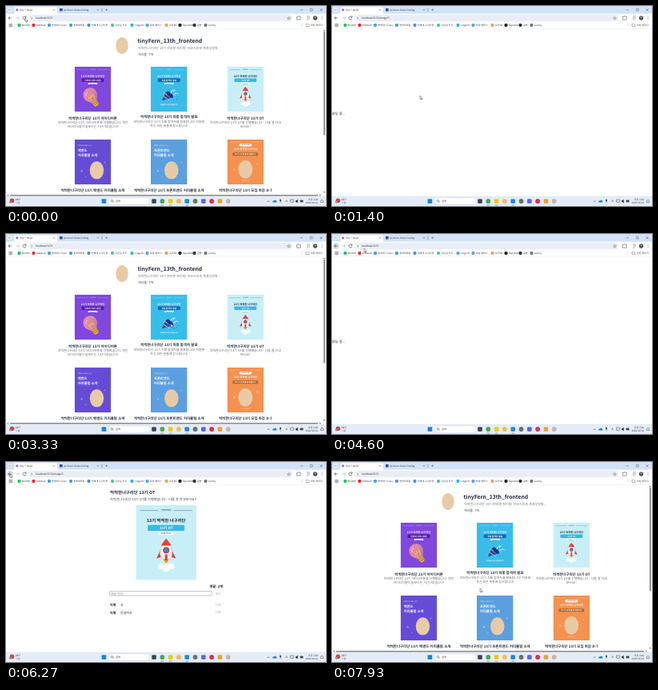
Write an HTML page that moves like this. It is 400 by 250 pixels and loops after 8000 ms.

```html
<!DOCTYPE html>
<html lang="ko">
<head>
<meta charset="utf-8">
<title>Vite + React</title>
<style>
  html, body { margin: 0; width: 100%; height: 100%; overflow: hidden; background: #fff; }
  svg#stage { display: block; width: 100vw; height: 100vh; }
  text {
    font-family: "Noto Sans CJK KR", "Noto Sans CJK", "Noto Sans", sans-serif;
    text-rendering: geometricPrecision;
    white-space: pre;
  }
  .list, .load, .first, .second, .third, .home, .visit1, .visit2, .visit3, .hover {
    animation: 8s step-end infinite;
  }
  .list { animation-name: list; }
  .load { animation-name: load; }
  .first { animation-name: first; }
  .second { animation-name: second; }
  .third { animation-name: third; }
  .home { animation-name: home; }
  .visit1 { animation-name: visit1; }
  .visit2 { animation-name: visit2; }
  .visit3 { animation-name: visit3; }
  .hover { animation-name: hover; }
  .cursor { animation: cursor 8s ease-in-out infinite; }

  @keyframes list {
    0%, 36.9%, 60%, 91.25% { opacity: 1; }
    15.6%, 42.9%, 68.75% { opacity: 0; }
    100% { opacity: 1; }
  }
  @keyframes load {
    0%, 18.1%, 36.9%, 45.6%, 60%, 71.25%, 91.25%, 100% { opacity: 0; }
    15.6%, 34.4%, 42.9%, 56.25%, 68.75%, 88.1% { opacity: 1; }
  }
  @keyframes first { 0%, 34.4%, 100% { opacity: 0; } 18.1% { opacity: 1; } }
  @keyframes second { 0%, 56.25%, 100% { opacity: 0; } 45.6% { opacity: 1; } }
  @keyframes third { 0%, 88.1%, 100% { opacity: 0; } 71.25% { opacity: 1; } }
  @keyframes home {
    0%, 34.4%, 56.25%, 88.1%, 100% { opacity: 1; }
    15.6%, 42.9%, 68.75% { opacity: 0; }
  }
  @keyframes visit1 { 0%, 34.4%, 100% { opacity: 0; } 15.6% { opacity: 1; } }
  @keyframes visit2 { 0%, 56.25%, 100% { opacity: 0; } 42.9% { opacity: 1; } }
  @keyframes visit3 { 0%, 88.1%, 100% { opacity: 0; } 68.75% { opacity: 1; } }
  @keyframes hover {
    0%, 34.8%, 58.5%, 89%, 100% { opacity: 0; }
    32.8%, 54.2%, 76.5% { opacity: 1; }
  }
  @keyframes cursor {
    0% { transform: translate(24px, 15px); }
    7.5% { transform: translate(54px, 23px); }
    14%, 26% { transform: translate(110px, 112px); }
    33%, 35% { transform: translate(5px, 15px); }
    41.5%, 47% { transform: translate(206px, 112px); }
    54.5%, 56.5% { transform: translate(5px, 15px); }
    57.5% { transform: translate(40px, 18px); }
    67.5%, 71% { transform: translate(295px, 112px); }
    77%, 89% { transform: translate(5px, 15px); }
    97%, 100% { transform: translate(185px, 158px); }
  }
</style>
</head>
<body>
<svg id="stage" viewBox="0 0 400 250" preserveAspectRatio="none"></svg>
<script>
const CLUB = '씩씩한너구리단';
const INK = '#202a3c';

const rect = (x, y, w, h, fill, r = 0, extra = '') =>
  `<rect x="${x}" y="${y}" width="${w}" height="${h}" rx="${r}" fill="${fill}" ${extra}/>`;
const dot = (x, y, r, fill, extra = '') =>
  `<circle cx="${x}" cy="${y}" r="${r}" fill="${fill}" ${extra}/>`;
const path = (d, fill, stroke = 'none', width = .6) =>
  `<path d="${d}" fill="${fill}" stroke="${stroke}" stroke-width="${width}"/>`;
// y is the vertical middle of the line
const label = (x, y, size, str, { fill = '#333', bold = 400, anchor = 'start', cls = '' } = {}) =>
  `<text class="${cls}" x="${x}" y="${y + size * .36}" font-size="${size}" font-weight="${bold}" fill="${fill}" text-anchor="${anchor}">${str}</text>`;
const centered = (x, y, size, str, fill, bold = 400) =>
  label(x, y, size, str, { fill, bold, anchor: 'middle' });
const group = (cls, body) => `<g class="${cls}">${body}</g>`;
const mascot = (x, y, rx = 7.8, ry = 10.6) =>
  `<ellipse cx="${x}" cy="${y}" rx="${rx}" ry="${ry}" fill="#e8cba6"/>`;

// Posters, drawn on a 46 x 57 sheet
function eventPoster(bg, ink, pill, title, art) {
  return rect(0, 0, 46, 57, bg)
    + path('M3 4H17M29 4H43', 'none', ink, .2) + centered(23, 4, 1.6, '인하대학교', ink)
    + centered(23, 11.8, 3.25, '13기 씩씩한 너구리단', ink, 800)
    + rect(9, 15, 28, 4.5, pill, .8)
    + centered(23, 17.2, 2.7, title, '#fff', 600)
    + rect(17, 20.6, 12, 2, '#fff', 1)
    + centered(23, 21.6, 1.4, '2025.03.21', '#444', 600)
    + art;
}
function coursePoster(bg, title, mascotX) {
  const white = { fill: '#fff', bold: 800 };
  return rect(0, 0, 46, 57, bg)
    + label(4, 8, 2, '씩씩한너구리단 13기', { fill: '#fff' })
    + label(4, 14, 4.3, title, white)
    + label(4, 19.8, 4.3, '커리큘럼 소개', white)
    + dot(9, 40, 1.2, '#ffffff55') + dot(38, 29, .9, '#ffffff55') + dot(14, 47, .8, '#ffffff55')
    + mascot(mascotX, 39, 8.8, 11.2);
}

const bulb = `<g transform="translate(20.5 37) rotate(-32) scale(.9)">
  ${path('M-4 7L-3.6 15Q0 18 3.6 15L4 7Z', '#e6b32c')}
  ${path('M-4 11H4M-3.6 13.6H3.6', 'none', '#8a5a20', .7)}
  <path d="M-5 9Q-5 7-7.5 5A10 10 0 1 1 7.5 5Q5 7 5 9Z" fill="url(#glass)"/>
  ${path('M-2 8L-4 0L-1 2L0 -1L1 2L4 0L2 8', 'none', '#f5c13c', 1)}
  ${path('M-6 -3Q-5 -7 -1 -7.5', 'none', '#f9c6dc', 1)}</g>`;

const confettiColors = ['#ffd84a', '#f05a7e', '#ffffff', '#3450c8'];
const confetti = Array.from({ length: 14 }, (_, i) => {
  const angle = i * 2.4, reach = 5 + (i * 5) % 8;
  return rect((25 + reach * Math.cos(angle)).toFixed(1), (35 + reach * .65 * Math.sin(angle)).toFixed(1),
    1.1, .9, confettiColors[i % 4], .2);
}).join('');
const popper = confetti
  + path('M14 43L19 32Q26 32 28 39Z', '#2846b4')
  + path('M16.5 38L21 41M18 34L25 39', 'none', '#ffd84a', 1)
  + `<ellipse cx="24" cy="35.5" rx="5.2" ry="2.4" transform="rotate(42 24 35.5)" fill="#16328c"/>`
  + path('M25 34Q27 28 31 30M28 36Q32 32 35 35', 'none', '#fff', .8)
  + centered(23, 48.5, 2, '함께하게 되어 반갑습니다!', '#fff', 700);

const rocket = dot(19, 46.5, 2.2, '#f7fdff') + dot(23, 47.5, 3.2, '#f7fdff') + dot(27, 46.5, 2.4, '#f7fdff')
  + path('M20.5 40Q23 48 25.5 40Z', '#f79a2e')
  + path('M18.8 34L15.6 40.5L19.8 39.3ZM27.2 34L30.4 40.5L26.2 39.3Z', '#df4038')
  + path('M23 25.5Q30 33 26.5 41H19.5Q16 33 23 25.5Z', '#f1eef0', '#b8c4cc', .4)
  + path('M23 25.5Q25.8 28.5 26.8 30.8H19.2Q20.2 28.5 23 25.5Z', '#e2443c')
  + dot(23, 34.3, 2, '#2f8fd0', 'stroke="#b8402f" stroke-width=".8"')
  + path('M22.1 37.5H23.9V42H22.1Z', '#df4038');

const recruit = rect(0, 0, 46, 57, '#f5924f')
  + path('M3 3.5H17M29 3.5H43', 'none', '#fff', .2)
  + rect(15, 5.6, 16, 3.2, '#fff', 1.6)
  + centered(23, 7.2, 1.8, '너구리단 모집', '#a04a18', 600)
  + centered(23, 12.6, 3.25, '13기 씩씩한 너구리단', '#fff', 800)
  + rect(7, 16.8, 32, 4, '#ad6a34', .6)
  + centered(23, 18.8, 2.5, '아기 너구리를 모집합니다', '#fff', 600)
  + mascot(23, 38, 9, 11.5)
  + dot(9, 38, 1.2, '#ffffff55') + dot(38, 31, 1, '#ffffff55')
  + centered(23, 52.5, 1.8, '모집 마감 D-7', '#fff');

const posters = [
  eventPoster('#8048df', '#fff', '#5717a8', '인하대 아이디어톤', bulb),
  eventPoster('#38bdeb', '#fff', '#1765b8', '최종 합격자 발표', popper),
  eventPoster('#c8eff8', '#142030', '#36b9e2', '13기 OT', rocket),
  coursePoster('#654cd6', '백엔드', 28),
  coursePoster('#5b9fe0', '프론트엔드', 26),
  recruit,
];
const poster = (i, x, y, w, h) => `<use href="#poster${i}" x="${x}" y="${y}" width="${w}" height="${h}"/>`;

const defs = `<defs>
  <linearGradient id="glass" x1="0" y1="0" x2="1" y2="1">
    <stop offset="0" stop-color="#e786b8"/><stop offset=".55" stop-color="#d98c98"/><stop offset="1" stop-color="#b065c0"/>
  </linearGradient>
  ${posters.map((p, i) => `<symbol id="poster${i}" viewBox="0 0 46 57" preserveAspectRatio="none">${p}</symbol>`).join('')}
</defs>`;

// Browser frame
function bookmark([x, color, name]) {
  return rect(x - 2, 22, 4, 4, color, 1.4) + label(x + 3.5, 24, 3, name);
}
const bookmarks = [
  [16.5, '#16c75c', 'MOORI'], [34.5, '#ef2b2b', 'VidNook'], [54, '#4aa0d8', '인하대 I-Class'],
  [81, '#4aa0d8', '인하대포털'], [103.5, '#4b90d8', '인하대 수강신청'], [133, '#4cc9a0', '다온길 지도'],
  [157.5, '#36b5ee', 'Lingomi'], [176.5, '#58a4e8', '토담 캠퍼스'], [200.5, '#e5a25f', 'OZTAE'],
  [217.5, '#222', 'RepoNet'], [235.5, '#333', '글방'], [249.5, '#777', 'Lumiq'],
];
const url = (suffix, cls) => label(37, 15, 3.15, 'localhost:5173' + suffix, { fill: '#222', cls });

const chrome = rect(0, 0, 400, 10, '#d2e2f8')
  + rect(0, 9.6, 400, 18.6, '#fff')
  + dot(4.5, 4.6, 2.6, '#e6effc') + path('M3.5 4.2L4.5 5.2L5.5 4.2', 'none', '#333', .5)
  + path('M9 10Q10.5 10 10.5 8V3.5Q10.5 1.5 12.5 1.5H62Q64 1.5 64 3.5V8Q64 10 65.5 10Z', '#fff')
  + dot(13.8, 4.8, 1.6, '#9a62ee') + label(17, 4.8, 3, 'Vite + React')
  + path('M59 3.7L61 5.7M61 3.7L59 5.7', 'none', '#444', .4)
  + rect(67, 3, 3.6, 3.6, '#2d4f98', .5) + label(72.5, 4.8, 3, 'picloom clone Coding')
  + path('M114 3.7L116 5.7M116 3.7L114 5.7M120 2.5V7M125.6 3.2V6.4M124 4.8H127.2', 'none', '#444', .4)
  + path('M368 4.8H371M392.5 3.3L395.5 6.3M395.5 3.3L392.5 6.3', 'none', '#333', .45)
  + rect(380.3, 3.3, 2.8, 2.8, 'none', .3, 'stroke="#333" stroke-width=".4"')
  + group('hover', dot(5, 15, 4, '#d8dce2'))
  + path('M7 15H3M4.8 13.2L3 15L4.8 16.8', 'none', '#333')
  + path('M12.5 15H16.5M14.7 13.2L16.5 15L14.7 16.8', 'none', '#aaa')
  + path('M24.8 14A2 2 0 1 0 25 15.6M25 12.6V14.3H23.4', 'none', '#333')
  + rect(28, 10.8, 330, 8.4, '#e9eef6', 4.2)
  + dot(32.2, 15, 2.8, '#fff') + path('M30.8 14.1H33.6M30.8 16H33.6', 'none', '#444', .5)
  + url('', 'home') + url('/image/7', 'visit1') + url('/image/6', 'visit2') + url('/image/5', 'visit3')
  + path('M353.5 13.2L354.1 14.5L355.5 14.6L354.4 15.6L354.7 17L353.5 16.2L352.3 17L352.6 15.6L351.5 14.6L352.9 14.5Z', 'none', '#555', .4)
  + path('M363.5 13.5H365A1 1 0 0 1 367 13.5H368.2V17.2H363.5Z', 'none', '#444', .5)
  + path('M376 13H380M376 15H380M376 17H378.5', 'none', '#555', .5)
  + dot(386.5, 15, 2.7, '#4b5260') + dot(386.5, 14.2, 1, '#b5a598')
  + dot(395, 13.3, .45, '#333') + dot(395, 15, .45, '#333') + dot(395, 16.7, .45, '#333')
  + path('M4 22.3H7.5V25.8H4ZM5.75 22.3V25.8M4 24H7.5', 'none', '#555', .5)
  + path('M11 22V26', 'none', '#bbb', .3)
  + bookmarks.map(bookmark).join('')
  + path('M370 22V26', 'none', '#bbb', .3) + path('M375 22.5H377L377.5 23H379V25.7H375Z', 'none', '#555', .4)
  + label(381, 24, 3, '모든 북마크')
  + path('M0 28.2H400', 'none', '#dfe3e8', .4);

// Post list
const posts = [
  { x: 108.5, y: 75.7, titleY: 140, title: '13기 아이디어톤',
    desc: [`${CLUB} 13기 아이디어톤을 진행했습니다. 멋진`, '아이디어들이 돋보이는 시간이었습니다!'] },
  { x: 203.8, y: 75.7, titleY: 138.2, title: '13기 최종 합격자 발표',
    desc: [`${CLUB} 13기 최종 합격자를 발표합니다! 지원해`, '주신 모든 분들께 감사합니다!'] },
  { x: 299.3, y: 75.7, titleY: 140, title: '13기 OT',
    desc: [`${CLUB} 13기 OT를 진행했습니다~ 다들 잘 지내`, '보아요!!'] },
  { x: 108.5, y: 166.7, titleY: 230.8, title: '13기 백엔드 커리큘럼 소개', desc: [] },
  { x: 203.8, y: 166.7, titleY: 230.8, title: '13기 프론트엔드 커리큘럼 소개', desc: [] },
  { x: 299.3, y: 166.7, titleY: 230.8, title: '13기 모집 마감 D-7', desc: [] },
];
const card = (p, i) => poster(i, p.x - 22.8, p.y, 45.6, 56.4)
  + centered(p.x, p.titleY, 4.45, `${CLUB} ${p.title}`, INK, 700)
  + p.desc.map((line, n) => centered(p.x, p.titleY + 6 + n * 5.1, 3.85, line, '#666')).join('');

const list = mascot(145, 49.6)
  + label(164.5, 43.5, 6.8, 'tinyFern_13th_frontend', { fill: INK, bold: 700 })
  + label(165, 52.5, 4, `${CLUB} 13기 여러분 화이팅! 자유시리로 폭풍성장통..`, { fill: '#777' })
  + label(165, 60.3, 4, '게시물: 7개', { fill: '#444' })
  + posts.map(card).join('')
  + rect(395, 28.5, 5, 209.5, '#fafafa') + rect(0, 235, 395, 3, '#fafafa')
  + rect(397, 31.5, 1.7, 130, '#858585', .8) + rect(5, 236, 385, 1.5, '#858585', .7)
  + path('M396.6 31L397.8 29.4L399 31ZM396.6 232L397.8 233.8L399 232Z', '#777')
  + path('M3 235.4L1.4 236.7L3 238ZM392 235.4L393.6 236.7L392 238Z', '#777');

// Post detail
function detail(i, title, lines, comments) {
  const shift = (lines.length - 1) * 5.6;
  const muted = { fill: '#aaa' };
  return label(130, 38, 5.4, `${CLUB} ${title}`, { fill: INK, bold: 700 })
    + lines.map((line, n) => label(130, 47 + n * 5.7, 4.1, line, { fill: '#444' })).join('')
    + poster(i, 162.4, 54 + shift, 75.6, 93.6)
    + label(271, 155 + shift, 4.2, `댓글: ${comments.length}개`, { fill: '#111', bold: 700, anchor: 'end' })
    + rect(129.6, 161.6 + shift, 127.6, 5.4, '#fff', .6, 'stroke="#888" stroke-width=".5"')
    + label(131, 164.3 + shift, 3.8, '댓글 작성...', { fill: '#888' })
    + label(261.5, 164.3 + shift, 3.8, '게시', muted)
    + (comments.length ? '' : centered(200, 173.3 + shift, 4.1, '댓글이 없습니다.', '#444'))
    + comments.map((c, n) => {
      const y = 178.7 + n * 9.4 + shift;
      return label(130, y, 4, '익명', { fill: '#111', bold: 700 })
        + label(143, y, 4, c, { fill: '#222' }) + label(261.5, y, 3.8, '삭제', muted);
    }).join('');
}

const pages = group('list', list)
  + group('load', label(0, 134, 4.2, '로딩 중...', { fill: '#222' }))
  + group('first', detail(0, '13기 아이디어톤',
    [`${CLUB} 13기 아이디어톤을 진행했습니다. 멋진 아이디어들이 돋보이는 시`, '간이었습니다!'], []))
  + group('second', detail(1, '13기 최종 합격자 발표',
    [`${CLUB} 13기 최종 합격자를 발표합니다! 지원해주신 모든 분들께 감사합`, '니다!'], []))
  + group('third', detail(2, '13기 OT',
    [`${CLUB} 13기 OT를 진행했습니다~ 다들 잘 지내보아요!!`], ['굿', '안녕하슈']));

// Taskbar
const apps = ['#3c4450', '#4fa35c', '#f2c811', '#f0bd4a', '#2488d8', '#6a7078', '#5865e8', '#e8285c', '#f0a030', '#c9b3ad'];
const taskbar = rect(0, 238, 400, 12, '#e4edf7')
  + path('M0 238H400', 'none', '#cfd8e2', .4)
  + dot(7.5, 243.2, 2.8, '#d8433c') + dot(5.5, 245, 1.6, '#8796a8')
  + label(12, 242, 3, '88°F') + label(12, 246.4, 3, '구름', { fill: '#666' })
  + rect(119.6, 241.2, 5.6, 5.6, '#1685d8', .4)
  + rect(128, 240, 52, 8, '#fff', 4, 'stroke="#d3dce6" stroke-width=".4"')
  + dot(132.4, 243.6, 1.3, 'none', 'stroke="#333" stroke-width=".5"') + path('M133.4 244.6L134.5 245.8', 'none', '#333', .5)
  + label(137, 244, 3.3, '검색')
  + apps.map((color, i) => i % 2
      ? dot(185 + i * 10.3, 244, 2.9, color)
      : rect(182.2 + i * 10.3, 241.2, 5.6, 5.6, color, 1.3)).join('')
  + path('M193.5 249H197M203.8 249H207.3M224.5 249H228', 'none', '#5a86b4', .7)
  + path('M326.5 245L328 243.4L329.5 245', 'none', '#333', .5)
  + path('M333.4 245.5Q332.6 243.4 335 243.2Q337 241.4 338 243.8Q339.4 245.5 337.6 245.5Z', '#2784d8')
  + rect(342.2, 241.5, 1.6, 3, '#333', .8) + path('M343 244.5V246.4', 'none', '#333', .4)
  + centered(350.5, 244, 3.6, 'A', '#333')
  + rect(355.5, 242, 4.2, 3.2, 'none', .3, 'stroke="#333" stroke-width=".5"')
  + path('M362 243L363 243L364.7 241.6V246.4L363 245H362Z', '#333')
  + rect(367.5, 242.6, 4, 2.6, '#444', .5)
  + label(390, 242, 3, '오전 2:26', { anchor: 'end' }) + label(390, 246.4, 3, '2025-06-21', { anchor: 'end' })
  + path('M393 245.3Q393.7 242 395 242Q396.3 242 397 245.3Z', 'none', '#444', .5);

const cursor = group('cursor', path('M0 0V4.6L1.1 3.6L1.9 5.3L2.6 5L1.9 3.4H3.3Z', '#fff', '#222', .4));

document.getElementById('stage').innerHTML = defs + rect(0, 0, 400, 250, '#fff') + pages + chrome + taskbar + cursor;
</script>
</body>
</html>
```
